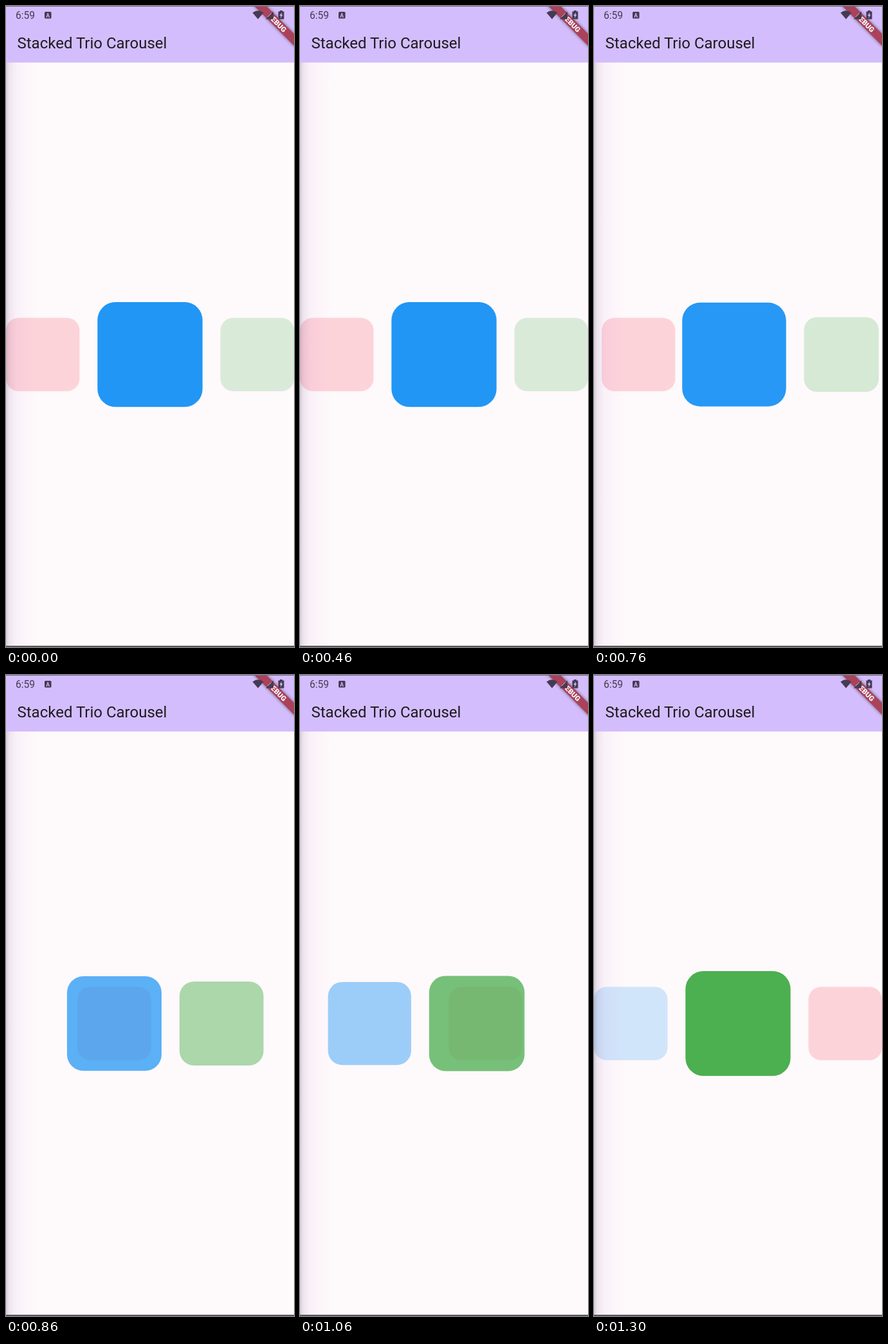
These frames come from a looping animation (448x998 px, 1330 ms). An HTML page:

```html
<!DOCTYPE html>
<html lang="en">
<head>
<meta charset="utf-8">
<title>Stacked Trio Carousel</title>
<style>
  html, body { margin: 0; width: 100%; height: 100%; overflow: hidden; background: #fef9fb; }
  svg { display: block; width: 100vw; height: 100vh; font-family: Roboto, sans-serif; }
</style>
</head>
<body>
<svg viewBox="0 0 448 998" preserveAspectRatio="none">
  <defs>
    <linearGradient id="edge">
      <stop offset="0" stop-color="#3c1e5a" stop-opacity=".2"/>
      <stop offset=".12" stop-color="#5a3278" stop-opacity=".1"/>
      <stop offset=".35" stop-color="#a050c8" stop-opacity=".045"/>
      <stop offset="1" stop-color="#c864dc" stop-opacity="0"/>
    </linearGradient>
    <filter id="blur" x="-20%" y="-60%" width="140%" height="220%">
      <feGaussianBlur stdDeviation="2.6"/>
    </filter>
  </defs>

  <rect width="448" height="998" fill="#fef9fb"/>
  <rect id="back" fill="#f83e54"/>
  <rect id="front" fill="#2196f5"/>
  <rect id="next" fill="#4caf50"/>
  <rect y="88" width="48" height="910" fill="url(#edge)"/>

  <rect width="448" height="88" fill="#d4bdfc"/>
  <text x="17.5" y="65.5" font-size="24" fill="#1d1b20">Stacked Trio Carousel</text>

  <g transform="translate(448 0) rotate(45)">
    <rect x="-46" y="30.5" width="92" height="13.1" fill="#000" opacity=".5" filter="url(#blur)"/>
    <rect x="-46" y="30.5" width="92" height="13.1" fill="#aa425a"/>
    <text y="41" font-size="11.1" font-weight="900" fill="#fff" text-anchor="middle">DEBUG</text>
  </g>

  <g fill="#453a54">
    <text x="15" y="20" font-size="15.6">6:59</text>
    <rect x="60" y="9" width="10.5" height="10.5" rx="1.5"/>
    <text x="65.2" y="17.5" font-size="8.5" font-weight="700" text-anchor="middle" fill="#d4bdfc">A</text>
    <path d="M383.5 10.5Q392 3.8 400.5 10.5L392 20.5Z"/>
    <path d="M404 20.5L416 8.500V20.500Z"/>
    <path d="M426 7h4v1.500h2.500v12h-9v-12h2.500z"/>
    <path d="M429 10l-3.500 5h2l-.5 4 3.500-5.500h-2z" fill="#d4bdfc"/>
  </g>
  <rect width="448" height="1" fill="#76658f"/>
  <rect y="996" width="448" height="2" fill="#5b555f"/>
</svg>

<script>
const LOOP = 1330, SIDE = 163.4, SMALL = 0.7, FADED = 0.2, CENTER_Y = 542.6;
const LEFT = 57.2, MIDDLE = 224, RIGHT = 390.8;
// Swipe progress: [ms, fraction]
const swipe = [[720, 0], [760, .036], [860, .333], [1060, .694], [1160, .922], [1300, 1]];
const [back, front, next] = ['back', 'front', 'next'].map(id => document.getElementById(id));

const mix = (a, b, p) => a + (b - a) * p;

function slope(i) {
  const a = swipe[i - 1], b = swipe[i + 1];
  return a && b ? (b[1] - a[1]) / (b[0] - a[0]) : 0;
}

// Smooth cubic through the swipe points
function progress(t) {
  if (t <= swipe[0][0]) return 0;
  const i = swipe.findIndex(key => key[0] > t) - 1;
  if (i < 0) return 1;
  const [t0, p0] = swipe[i], [t1, p1] = swipe[i + 1];
  const d = t1 - t0, u = (t - t0) / d, v = 1 - u;
  return p0 + (p1 - p0) * u * u * (3 - 2 * u) + d * u * v * (slope(i) * v - slope(i + 1) * u);
}

// focus: 0 for a side card, 1 for the centred card
function place(card, x, focus) {
  const size = SIDE * mix(SMALL, 1, focus);
  const attributes = {
    x: x - size / 2, y: CENTER_Y - size / 2, width: size, height: size,
    rx: size * 0.172, opacity: mix(FADED, 1, focus)
  };
  for (const name in attributes) card.setAttribute(name, attributes[name]);
}

function draw(now) {
  // 30 steps per second on a 10 ms clock
  const step = Math.ceil((Math.floor(now % LOOP / 10) + 1) * 3 / 10) - 1;
  const p = progress(Math.floor(step * 10 / 3) * 10);
  place(back, mix(LEFT, RIGHT, p), 0);
  place(front, mix(MIDDLE, LEFT, p), 1 - p);
  place(next, mix(RIGHT, MIDDLE, p), p);
}

const start = performance.now();
function tick() {
  draw(performance.now() - start);
  requestAnimationFrame(tick);
}
tick();
</script>
</body>
</html>
```
